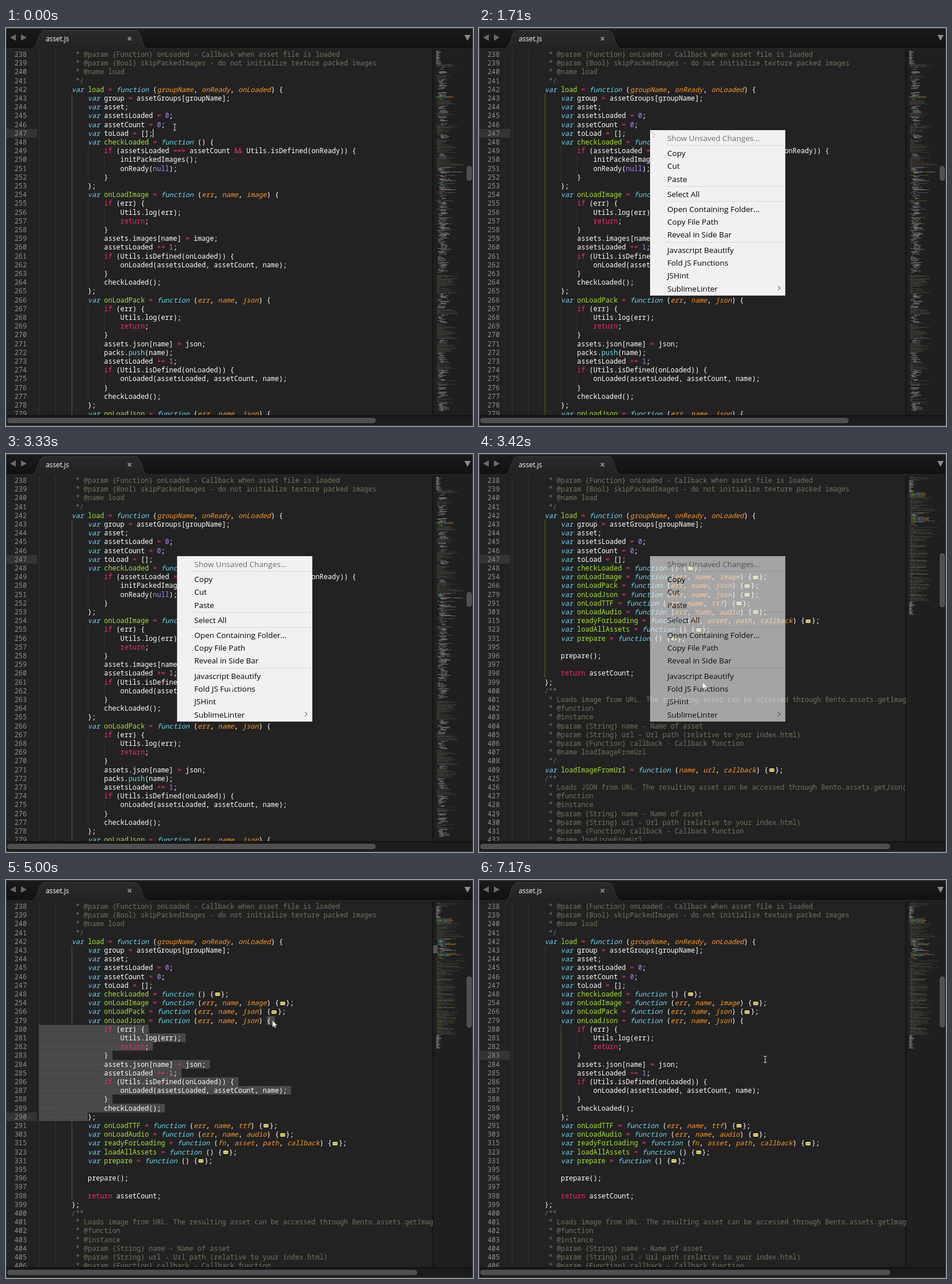
Write an HTML page with a canvas that moves like this. It is 811 by 690 pixels and loops after 7370 ms.

```html
<!DOCTYPE html>
<html lang="en">
<head>
<meta charset="utf-8">
<title>asset.js</title>
<style>
  html, body { margin: 0; width: 100%; height: 100%; overflow: hidden; background: #222; }
  #stage { position: absolute; left: 0; top: 0; width: 811px; height: 690px; overflow: hidden; background: #222; }
  #stage div, #stage pre, #stage b, #stage i, #stage canvas, #stage svg { position: absolute; }
  #tabs { left: 0; top: 0; }
  #tabs text, #menu { font-family: "Open Sans", "Noto Sans", sans-serif; }
  .side { left: 740px; top: 37px; width: 71px; height: 634px; background: #1f1f1f; box-shadow: inset 2px 0 2px #161616; }
  .foot { left: 0; top: 671px; width: 811px; height: 19px; background: #1c1c1c; box-shadow: inset 0 2px 2px #121212; }
  .edge { inset: 0; border: 1px solid #444; pointer-events: none; }

  /* editor views */
  .view { inset: 0; opacity: 0; }
  .pane { left: 0; top: 38px; width: 741px; height: 633px; overflow: hidden; }
  .pane, pre { font: 500 11.775px/15.2px "Noto Sans Mono", "DejaVu Sans Mono", monospace; color: #fff; margin: 0; white-space: pre; }
  .layer { inset: 0; }
  .row { left: 0; width: 100%; height: 15.2px; }
  .row b { right: 705px; font-weight: normal; color: #8f908a; }
  .row pre { left: 57.4px; }
  .guide { width: 1px; height: 15.2px; background: #343434; }
  .active { width: 1px; background: #675a20; }
  .line { left: 1px; width: 53px; height: 15.2px; background: #343434; }
  .pick { height: 15.2px; background: #484848; }
  .dots { left: 57.4px; color: #6c6c6c; }
  .fold { display: inline-block; width: 9px; height: 6px; margin: 0 1.5px 1px; border-radius: 2px; vertical-align: middle;
    background: radial-gradient(circle, #5b5520 .8px, transparent 1px) 0 0 / 3px 6px, #e6db74; }
  .view canvas { left: 742px; top: 38px; }
  .thumb { background: #4f4f4f; border: 1px solid #575757; border-radius: 5px; box-sizing: border-box; }
  .caret { width: 1px; height: 15px; background: #f8f8f0; opacity: 0; }

  /* context menu */
  #menu { left: 297px; top: 177px; width: 235px; height: 287px; padding-top: 2.7px; box-sizing: border-box;
    background: #f1f1f1; box-shadow: inset 0 0 0 1px #dedede; font-size: 13.5px; line-height: 22.35px; color: #000; }
  #menu p { position: relative; margin: 0 0 0 30px; white-space: pre; }
  #menu hr { position: relative; height: 1px; margin: 1px 2px 1.8px 27px; border: 0; background: #d9d9d9; }
  #menu .off { color: #6d6d6d; }
  #menu svg { left: 220px; top: 269px; }
  #hover { left: 2px; width: 232px; height: 22px; background: #91c9f7; }
  #mouse { left: 0; top: 0; width: 1px; height: 1px; }
  #mouse svg { left: 0; top: 0; overflow: visible; }

  /* timeline */
  .t { animation: 7.37s linear infinite; }
  .t.cut { animation-timing-function: step-end; }
  #open { animation-name: open; }
  #folded { animation-name: folded; }
  #part { animation-name: part; }
  .before { animation-name: before; }
  .after { animation-name: after; }
  #menu { animation-name: menu; }
  #hover { animation-name: hover; }
  #mouse { animation-name: mouse; }
  #beam { animation-name: beam; }
  #arrow { animation-name: arrow; }
  #blink1 { animation-name: blink1; left: 255px; top: 175px; }
  #blink2 { animation-name: blink2; left: 142px; top: 403px; }
  #blink3 { animation-name: blink3; left: 177px; top: 296px; }
  @keyframes open { 0% { opacity: 1 } 46.13%, 100% { opacity: 0 } }
  @keyframes folded { 0% { opacity: 0 } 46.13% { opacity: 1 } 67.84%, 100% { opacity: 0 } }
  @keyframes part { 0% { opacity: 0 } 67.84%, 100% { opacity: 1 } }
  @keyframes before { 0% { opacity: 1 } 82.36%, 100% { opacity: 0 } }
  @keyframes after { 0% { opacity: 0 } 82.36%, 100% { opacity: 1 } }
  @keyframes menu {
    0%, 22.78% { opacity: 0 } 22.79% { opacity: .5 } 23.2%, 45.32% { opacity: 1 } 48.3%, 100% { opacity: 0 }
  }
  @keyframes hover {
    0% { opacity: 0; top: 29px } 26.89% { opacity: 1; top: 29px } 27.57% { opacity: 1; top: 51px }
    28.29% { opacity: 1; top: 74px } 29.1% { opacity: 1; top: 100px } 29.91% { opacity: 1; top: 126px }
    30.6% { opacity: 1; top: 148px } 31.9% { opacity: 1; top: 170px } 33.98% { opacity: 1; top: 197px }
    35.74% { opacity: 1; top: 219px } 44.5%, 100% { opacity: 0; top: 219px }
  }
  @keyframes mouse {
    0%, 22.78% { transform: translate(293px, 172px) }
    22.79%, 26.05% { transform: translate(298px, 179px) }
    30.94% { transform: translate(377px, 336px) }
    35.82%, 46.13% { transform: translate(389px, 397px) }
    48.3%, 55.09% { transform: translate(388px, 389px) }
    56.85% { transform: translate(372px, 358px) }
    64.72% { transform: translate(456px, 246px) }
    65.13%, 76.9% { transform: translate(463px, 244px) }
    82.09%, 88.06% { transform: translate(497px, 295px) }
    89.55%, 100% { transform: translate(497px, 311px) }
  }
  @keyframes beam {
    0% { opacity: 1 } 22.79% { opacity: 0 } 48.3% { opacity: 1 } 65.13% { opacity: 0 } 77.6%, 100% { opacity: 1 }
  }
  @keyframes arrow {
    0% { opacity: 0 } 22.79% { opacity: 1 } 48.3% { opacity: 0 } 65.13% { opacity: 1 } 77.6%, 100% { opacity: 0 }
  }
  @keyframes blink1 {
    0%, 4.88% { opacity: 1 } 6.51%, 12.35% { opacity: 0 } 14.25%, 18.59% { opacity: 1 } 18.86%, 25.78% { opacity: 0 }
    27.14%, 31.75% { opacity: 1 } 32.29%, 39.21% { opacity: 0 } 40.43%, 44.5% { opacity: 1 } 45.05%, 52.37% { opacity: 0 }
    53.19%, 58.62% { opacity: 1 } 59.16%, 65.54% { opacity: 0 } 66.49%, 67.83% { opacity: 1 } 67.84%, 100% { opacity: 0 }
  }
  @keyframes blink2 {
    0%, 69.5% { opacity: 0 } 70.56%, 76.8% { opacity: 1 } 77.34%, 100% { opacity: 0 }
  }
  @keyframes blink3 {
    0%, 82.35% { opacity: 0 } 82.36%, 88.06% { opacity: 1 } 89.55%, 100% { opacity: 0 }
  }
</style>
</head>
<body>
<div id="stage">
  <div class="side"></div>
  <div class="foot"></div>
  <svg id="tabs" width="811" height="38">
    <defs>
      <linearGradient id="bar" x2="0" y2="1"><stop stop-color="#1b1b1b"/><stop offset="1" stop-color="#111"/></linearGradient>
      <linearGradient id="tab" x2="0" y2="1"><stop stop-color="#2a2a2a"/><stop offset="1" stop-color="#222"/></linearGradient>
    </defs>
    <path fill="url(#bar)" d="M0 0H811V35.500H0Z"/>
    <path fill="none" stroke="#2a2a2a" d="M0 35.500H811"/>
    <path fill="url(#tab)" stroke="#3a3a3a" d="M44 35.500C57 35 54 4.500 67 4.500H224C237 4.500 234 35 247 35.500"/>
    <path fill="#222" d="M44 35H247V38H44Z"/>
    <path fill="#6b6b6b" d="M17 11V22L7 16.500ZM26 11V22L36 16.500Z"/>
    <path fill="#8c8c8c" d="M796 12H807L801.500 22Z"/>
    <path stroke="#8c8c8c" stroke-width="1.800" d="M211.500 15.500L217.500 21.500M217.500 15.500L211.500 21.500"/>
    <text x="69" y="23" font-size="11.800" fill="#fff">asset.js</text>
  </svg>
  <div id="open" class="view t cut"></div>
  <div id="folded" class="view t cut"></div>
  <div id="part" class="view t cut"></div>
  <div id="blink1" class="caret t"></div>
  <div id="blink2" class="caret t"></div>
  <div id="blink3" class="caret t"></div>
  <div id="menu" class="t">
    <div id="hover" class="t cut"></div>
    <p class="off">Show Unsaved Changes...</p><hr>
    <p>Copy</p><p>Cut</p><p>Paste</p><hr>
    <p>Select All</p><hr>
    <p>Open Containing Folder...</p><p>Copy File Path</p><p>Reveal in Side Bar</p><hr>
    <p>Javascript Beautify</p><p>Fold JS Functions</p><p>JSHint</p><p>SublimeLinter</p>
    <svg width="8" height="10"><path d="M2 1L6 5L2 9" fill="none" stroke="#333"/></svg>
  </div>
  <div id="mouse" class="t">
    <svg id="beam" class="t cut" width="1" height="1">
      <path fill="none" stroke="#e4e4e4" d="M-2.500 -5.500H-1L0 -4.800L1 -5.500H2.500M0 -5V5M-2.500 5.500H-1L0 4.800L1 5.500H2.500"/>
    </svg>
    <svg id="arrow" class="t cut" width="1" height="1">
      <path fill="#fff" d="M0 0V11L2.600 8.600L4.300 12.200L5.800 11.500L4.200 8H7.800Z"/>
      <path fill="none" stroke="#777" stroke-width=".7" d="M0 0L7.800 8M4.200 8L5.800 11.500"/>
    </svg>
  </div>
  <div class="edge"></div>
</div>
<script>
const CW = 7.065, LH = 15.2, X0 = 57.4;
const ink = { w: '#fff', c: '#75715e', k: '#f92672', s: '#66d9ef', x: '#66d9ef', f: '#a6e22e', p: '#fd971f', n: '#ae81ff', m: '#e6db74' };

// numbered lines; a "12|" prefix jumps to that number
function number(start, text) {
  let n = start - 1;
  return text.split('\n').map(s => {
    const jump = s.match(/^(\d+)\|(.*)/);
    n = jump ? +jump[1] : n + 1;
    return { n, text: jump ? jump[2] : s };
  });
}

const head = number(238, `         * @param {Function} onLoaded - Callback when asset file is loaded
         * @param {Bool} skipPackedImages - do not initialize texture packed images
         * @name load
         */
        var load = function (groupName, onReady, onLoaded) {
            var group = assetGroups[groupName];
            var asset;
            var assetsLoaded = 0;
            var assetCount = 0;
            var toLoad = [];`);

const fail = `                if (err) {
                    Utils.log(err);
                    return;
                }`;
const done = `                assetsLoaded += 1;
                if (Utils.isDefined(onLoaded)) {
                    onLoaded(assetsLoaded, assetCount, name);
                }
                checkLoaded();
            };`;
const jsonHead = '            var onLoadJson = function (err, name, json) {';

const bodies = number(248, `            var checkLoaded = function () {
                if (assetsLoaded === assetCount && Utils.isDefined(onReady)) {
                    initPackedImages();
                    onReady(null);
                }
            };
            var onLoadImage = function (err, name, image) {
${fail}
                assets.images[name] = image;
${done}
            var onLoadPack = function (err, name, json) {
${fail}
                assets.json[name] = json;
                packs.push(name);
${done}
${jsonHead}`);

const foldedTop = number(248, `            var checkLoaded = function () {~};
254|            var onLoadImage = function (err, name, image) {~};
266|            var onLoadPack = function (err, name, json) {~};`);

const jsonBody = number(279, `${jsonHead}
${fail}
                assets.json[name] = json;
${done}`);

const doc = (what, call, name) => `        /**
         * Loads ${what} from URL. The resulting asset can be accessed through Bento.assets.${call}(assetName)
         * @function
         * @instance
         * @param {String} name - Name of asset
         * @param {String} url - Url path (relative to your index.html)
         * @param {Function} callback - Callback function
         * @name ${name}
         */`;

const tail = number(291, `            var onLoadTTF = function (err, name, ttf) {~};
303|            var onLoadAudio = function (err, name, audio) {~};
315|            var readyForLoading = function (fn, asset, path, callback) {~};
323|            var loadAllAssets = function () {~};
331|            var prepare = function () {~};
395|
            prepare();

            return assetCount;
        };
${doc('image', 'getImage', 'loadImageFromUrl')}
        var loadImageFromUrl = function (name, url, callback) {~};
425|${doc('JSON', 'getJson', 'loadJsonFromUrl')}`);

function tokens(text) {
  if (/^\s*(\/\*|\*)/.test(text)) return [['c', text]];
  let args = false;
  return [...text.matchAll(/\w+|[=&+]+|\s+|./g)].map(m => {
    const s = m[0], word = /^\w/.test(s);
    let kind = 'w';
    if (/^(var|function)$/.test(s)) kind = 's';
    else if (/^(if|return|[=&+]+)$/.test(s)) kind = 'k';
    else if (/^(\d+|null)$/.test(s)) kind = 'n';
    else if (s === 'push') kind = 'x';
    else if (s === '~') kind = 'm';
    else if (word && text.startsWith(' = function', m.index + s.length)) kind = 'f';
    else if (word && args) kind = 'p';
    if (s === 'function') args = true;
    if (s === ')') args = false;
    return [kind, s];
  });
}

function add(parent, tag, cls, style = {}, text = '') {
  const el = document.createElement(tag);
  el.className = cls;
  for (const k in style) el.style[k] = typeof style[k] === 'number' ? style[k] + 'px' : style[k];
  el.textContent = text;
  parent.append(el);
  return el;
}

const guideX = col => Math.round(X0 + col * CW - .4);

function drawGuides(layer, line, i) {
  const indent = line.text ? line.text.search(/\S/) : 12;
  for (let c = 0; c + 4 <= indent; c += 4) add(layer, 'i', 'guide', { left: guideX(c), top: i * LH });
}

function drawRow(pane, line, i) {
  const row = add(pane, 'div', 'row', { top: i * LH });
  add(row, 'b', '', {}, line.n);
  const pre = add(row, 'pre', '');
  for (const [kind, s] of tokens(line.text)) {
    if (kind === 'm') add(pre, 'span', 'fold');
    else add(pre, 'span', '', { color: ink[kind], fontStyle: /[sp]/.test(kind) ? 'italic' : 'normal' }, s);
  }
}

const markLine = (box, i) => add(box, 'div', 'line', { top: i * LH });
const markGuide = (box, col, from, to) =>
  add(box, 'div', 'active', { left: guideX(col), top: from * LH, height: (to - from) * LH });

// invented lines for the parts of the file seen only in the minimap
function filler(spec, seed) {
  const rnd = () => (seed = seed * 16807 % 2147483647) / 2147483647;
  const word = (min, max) => 'x'.repeat(min + rnd() * (max - min));
  const code = () => [() => '}', () => word(4, 9) + '();', () => `if (${word(3, 12)}) {`,
    () => `${word(4, 10)} = ${word(3, 12)};`, () => `${word(4, 9)}.${word(4, 9)}(${word(3, 9)});`][Math.floor(rnd() * 5)]();
  const make = {
    c: () => '         * ' + Array.from({ length: 1 + rnd() * 8 }, () => word(3, 9)).join(' '),
    k: () => ' '.repeat(12 + 4 * Math.floor(rnd() * 3)) + code(),
    g: () => `        var ${word(6, 16)} = function (${word(3, 7)}, ${word(3, 9)}) {`,
    n: () => '        ' + word(3, 14) + (rnd() < .4 ? ' = 0' : ','),
    b: () => ''
  };
  return [...spec.matchAll(/([a-z])(\d+)/g)].flatMap(m => Array.from({ length: +m[2] }, make[m[1]]));
}

function minimap(view, lines) {
  const cv = add(view, 'canvas', '');
  cv.width = 55;
  cv.height = 633;
  const g = cv.getContext('2d');
  g.globalAlpha = .48;
  lines.forEach((text, i) => {
    let col = 0;
    for (const [kind, s] of tokens(text)) {
      g.fillStyle = ink[kind];
      for (const m of s.matchAll(/\S+/g)) g.fillRect((col + m.index) * .65, 1 + i * 1.2, m[0].length * .65, .75);
      col += s.length;
    }
  });
}

function build(id, lines, above, below, thumbTop, thumbHeight, footWidth) {
  const view = document.getElementById(id);
  const pane = add(view, 'div', 'pane');
  const guides = add(pane, 'div', 'layer');
  const marks = add(pane, 'div', 'layer');
  lines.forEach((line, i) => {
    drawGuides(guides, line, i);
    drawRow(pane, line, i);
  });
  minimap(view, [...above, ...lines.map(l => l.text), ...below]);
  add(view, 'div', 'thumb', { left: 800, top: thumbTop, width: 9, height: thumbHeight });
  add(view, 'div', 'thumb', { left: 2, top: 676, width: footWidth, height: 9 });
  return { view, marks };
}

const longAbove = filler('n20c4k10b2c6k14b4k6g3k3c8k10c6k12c14k6c20k6c10', 11);
const longBelow = filler('k11g1k11g1k11g1k8g1k8g1k62b2c28k20c9k14c22k6c14k14c10k16c6k18c8k12', 23);
const above = filler('c6n17g7c18', 37);
const below = filler('g1c9'.repeat(9) + 'n19', 51);

const open = build('open', [...head, ...bodies], longAbove, longBelow, 239, 26, 640);
markLine(open.marks, 9);
markGuide(open.marks, 8, 5, 42);

const folded = build('folded', [...head, ...foldedTop, { n: 279, text: jsonHead + '~};' }, ...tail], above, below, 172, 94, 712);
markLine(folded.marks, 9);
markGuide(folded.marks, 8, 5, 23);

const partLines = [...head, ...foldedTop, ...jsonBody, ...tail];
const part = build('part', partLines, above, below, 167, 89, 712);
const before = add(part.marks, 'div', 'layer before t cut');
const after = add(part.marks, 'div', 'layer after t cut');
markLine(before, 24);
markGuide(before, 8, 5, 34);
markLine(after, 17);
markGuide(after, 12, 14, 24);
for (let i = 13; i <= 24; i++) {
  const text = partLines[i].text;
  const from = i === 13 ? text.length - 1 : 0;
  const to = i === 24 ? 12 : text.length + 1;
  add(before, 'div', 'pick', { left: X0 + from * CW, top: i * LH, width: (to - from) * CW });
  if (i > 13) add(before, 'pre', 'dots', { top: i * LH }, text.slice(0, to).replace(/./g, c => c === ' ' ? '·' : ' '));
}
const shade = add(part.view, 'div', 'before t cut', { left: 742, top: 113, width: 8, height: 14, background: '#77777799' });
part.view.insertBefore(shade, part.view.querySelector('canvas'));
</script>
</body>
</html>
```
